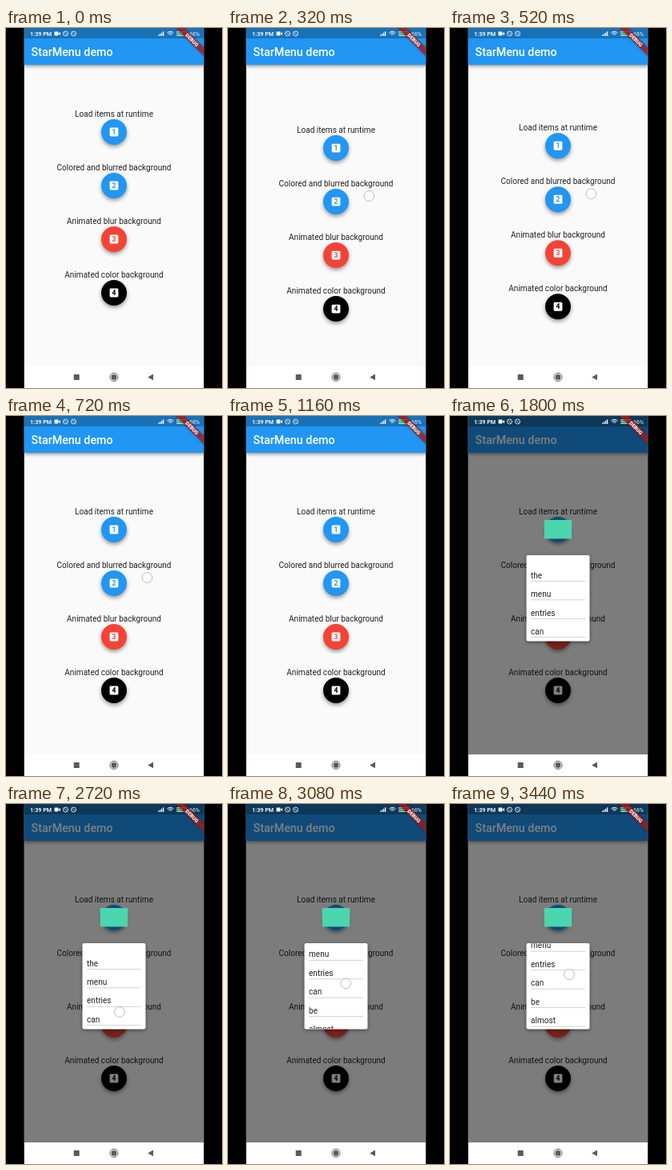
An HTML page with a canvas that plays this animation: 270x450 px, repeating every 3480 ms.

```html
<!DOCTYPE html>
<html lang="en">
<head>
<meta charset="utf-8">
<title>Menu demo</title>
<style>
html, body { margin: 0; width: 100%; height: 100%; overflow: hidden; background: #000; }
canvas { display: block; width: 270px; height: 450px; }
</style>
</head>
<body>
<canvas id="stage"></canvas>
<script>
const W = 270, H = 450, LOOP = 3480;
const LEFT = 22.5, RIGHT = 247.5, NAV_TOP = 423;
const OPEN_AT = 1480;
const canvas = document.getElementById('stage');
const dpr = window.devicePixelRatio || 1;
canvas.width = W * dpr;
canvas.height = H * dpr;
const ctx = canvas.getContext('2d');

const rows = [
  ['Load items at runtime', '#2196f3'],
  ['Colored and blurred background', '#2196f3'],
  ['Animated blur background', '#f44336'],
  ['Animated color background', '#000']
];
const words = ['the', 'menu', 'entries', 'can', 'be', 'almost', 'anything'];

// Key points: [time, value]
const dragKeys = [[80, 0], [160, 5], [240, 13], [320, 20], [400, 22], [500, 18], [600, 14.5], [720, 12], [920, 12]];
const scrollKeys = [[2720, 0], [2800, 5], [2900, 16], [3020, 30], [3140, 39], [3240, 43], [3440, 45.6]];

const clamp = v => Math.max(0, Math.min(1, v));
const mix = (a, b, k) => a + (b - a) * k;
const easeOut = k => 1 - Math.pow(1 - k, 3);

function track(keys, t) {
  if (t <= keys[0][0]) return keys[0][1];
  for (let i = 1; i < keys.length; i++) {
    const [t0, v0] = keys[i - 1], [t1, v1] = keys[i];
    if (t <= t1) return mix(v0, v1, (t - t0) / (t1 - t0));
  }
  return keys[keys.length - 1][1];
}

function rect(x, y, w, h, color) {
  ctx.fillStyle = color;
  ctx.fillRect(x, y, w, h);
}

function roundRect(x, y, w, h, r, color) {
  ctx.beginPath();
  ctx.roundRect(x, y, w, h, r);
  ctx.fillStyle = color;
  ctx.fill();
}

function disc(x, y, r, color) {
  ctx.beginPath();
  ctx.arc(x, y, r, 0, Math.PI * 2);
  ctx.fillStyle = color;
  ctx.fill();
}

function ring(x, y, r, color, width) {
  ctx.beginPath();
  ctx.arc(x, y, r, 0, Math.PI * 2);
  ctx.strokeStyle = color;
  ctx.lineWidth = width;
  ctx.stroke();
}

function poly(points, color) {
  ctx.beginPath();
  points.forEach(([x, y]) => ctx.lineTo(x, y));
  ctx.closePath();
  ctx.fillStyle = color;
  ctx.fill();
}

function text(str, x, y, size, color, weight = 400, align = 'left') {
  ctx.font = `${weight} ${size}px Roboto, sans-serif`;
  ctx.textAlign = align;
  ctx.fillStyle = color;
  ctx.fillText(str, x, y);
}

function withShadow(alpha, blur, dy, draw) {
  ctx.save();
  ctx.shadowColor = `rgba(0,0,0,${alpha})`;
  ctx.shadowBlur = blur * dpr;
  ctx.shadowOffsetY = dy * dpr;
  draw();
  ctx.restore();
}

function drawPage(offset) {
  rect(LEFT, 0, RIGHT - LEFT, NAV_TOP, '#fafafa');
  rows.forEach(([label, color], i) => {
    const y = 130 + i * 67 + offset;
    text(label, 135, y - 19, 10.05, '#212121', 400, 'center');
    withShadow(0.4, 5, 2.5, () => disc(135, y, 16, color));
    roundRect(129.6, y - 5.4, 10.8, 10.8, 1.4, '#fff');
    text(i + 1, 135, y + 3.1, 8.5, color, 700, 'center');
  });
  withShadow(0.4, 4, 1.5, () => rect(LEFT, 12, RIGHT - LEFT, 34, '#2196f3'));
  rect(LEFT, 0, RIGHT - LEFT, 13, '#1971b6');
  text('StarMenu demo', 31.5, 34.7, 14.3, '#fff', 500);
}

function drawStatus() {
  const white = '#f5f5f5';
  text('1:39 PM', 30, 9.7, 7.2, white, 700);
  roundRect(60.5, 4.6, 5, 5, 0.8, white);
  poly([[65.3, 7], [68, 4.9], [68, 9.3]], white);
  [74.5, 84.5].forEach(x => {
    ring(x, 7, 3, white, 0.9);
    ctx.beginPath();
    ctx.moveTo(x - 1.5, 5.5);
    ctx.lineTo(x + 1.5, 8.5);
    ctx.stroke();
  });
  for (let i = 0; i < 4; i++) rect(190 + i * 2, 8.5 - i * 1.4, 1.3, 1.5 + i * 1.4, white);
  [1.8, 3.6, 5.4].forEach(r => {
    ctx.beginPath();
    ctx.arc(205.5, 9.7, r, -Math.PI * 0.77, -Math.PI * 0.23);
    ctx.strokeStyle = white;
    ctx.lineWidth = 1;
    ctx.stroke();
  });
  ctx.lineWidth = 0.8;
  ctx.strokeRect(214, 4.4, 11, 5.2);
  rect(225.4, 6, 1.2, 2, white);
  rect(215, 5.4, 6, 3.2, '#4cd964');
  text('66%', 229, 9.7, 7, white);
}

function drawBanner() {
  ctx.save();
  ctx.beginPath();
  ctx.rect(LEFT, 0, RIGHT - LEFT, NAV_TOP);
  ctx.clip();
  ctx.translate(RIGHT, 0);
  ctx.rotate(Math.PI / 4);
  withShadow(0.5, 3, 0, () => rect(-27, 17.5, 54, 7.5, 'rgba(183,28,28,0.72)'));
  text('DEBUG', 0, 23.5, 6.3, '#fff', 900, 'center');
  ctx.restore();
}

function drawNav() {
  rect(LEFT, NAV_TOP, RIGHT - LEFT, H - NAV_TOP, '#fff');
  rect(84.7, 433, 7, 7, '#5a5a5a');
  ring(135, 436.4, 5, '#5a5a5a', 1);
  disc(135, 436.4, 3.4, '#5a5a5a');
  poly([[177.2, 436.4], [184, 432.6], [184, 440.2]], '#5a5a5a');
}

// Draws around its own centre, scaled and faded by the opening progress
function popItem(x, y, scale, alpha, draw) {
  ctx.save();
  ctx.globalAlpha = alpha;
  ctx.translate(x, y);
  ctx.scale(scale, scale);
  draw();
  ctx.restore();
}

function drawPanel(scroll) {
  withShadow(0.45, 4, 1.5, () => roundRect(-39.5, -54, 79, 107.5, 2, '#fff'));
  ctx.beginPath();
  ctx.rect(-39.5, -53.5, 79, 106.5);
  ctx.clip();
  words.forEach((word, i) => {
    const y = -25.4 + i * 23.45 - scroll;
    text(word, -34, y, 10.05, '#212121');
    rect(-34, y + 3.4, 68, 0.8, '#c9c9c9');
  });
}

function drawMenu(t) {
  rect(LEFT, 0, RIGHT - LEFT, NAV_TOP, 'rgba(0,0,0,0.5)');
  const first = easeOut(clamp((t - OPEN_AT + 60) / 320));
  const second = easeOut(clamp((t - OPEN_AT - 20) / 290));
  if (second > 0) {
    popItem(135, mix(142, 228, second), second, clamp(second * 1.5),
      () => drawPanel(track(scrollKeys, t)));
  }
  const tint = clamp((t - OPEN_AT) / 120);
  const color = `rgb(${mix(190, 75, tint)},${mix(222, 214, tint)},${mix(228, 174, tint)})`;
  popItem(135, 141.7, first, mix(0.55, 1, tint), () => rect(-17.2, -11.7, 34.4, 23.4, color));
}

function drawTouch(x, y, alpha) {
  ctx.save();
  ctx.globalAlpha = alpha;
  disc(x, y, 6.4, 'rgba(255,255,255,0.6)');
  ring(x, y, 6.4, 'rgba(150,150,150,0.75)', 0.8);
  ctx.restore();
}

function render(t) {
  ctx.setTransform(dpr, 0, 0, dpr, 0, 0);
  rect(0, 0, W, H, '#000');
  const offset = track(dragKeys, t);
  ctx.save();
  ctx.beginPath();
  ctx.rect(LEFT, 0, RIGHT - LEFT, H);
  ctx.clip();
  drawPage(offset);
  if (t >= OPEN_AT) drawMenu(t);
  drawStatus();
  drawBanner();
  drawNav();
  if (t >= 80 && t < 920) drawTouch(176.5, 190 + offset, clamp((920 - t) / 100));
  if (t >= 2720) {
    const k = track(scrollKeys, t) / 45.6;
    drawTouch(mix(142, 149, k), mix(260, 213, k), 1);
  }
  ctx.restore();
}

const start = performance.now();
function tick() {
  render((performance.now() - start) % LOOP);
  requestAnimationFrame(tick);
}
tick();
</script>
</body>
</html>
```
